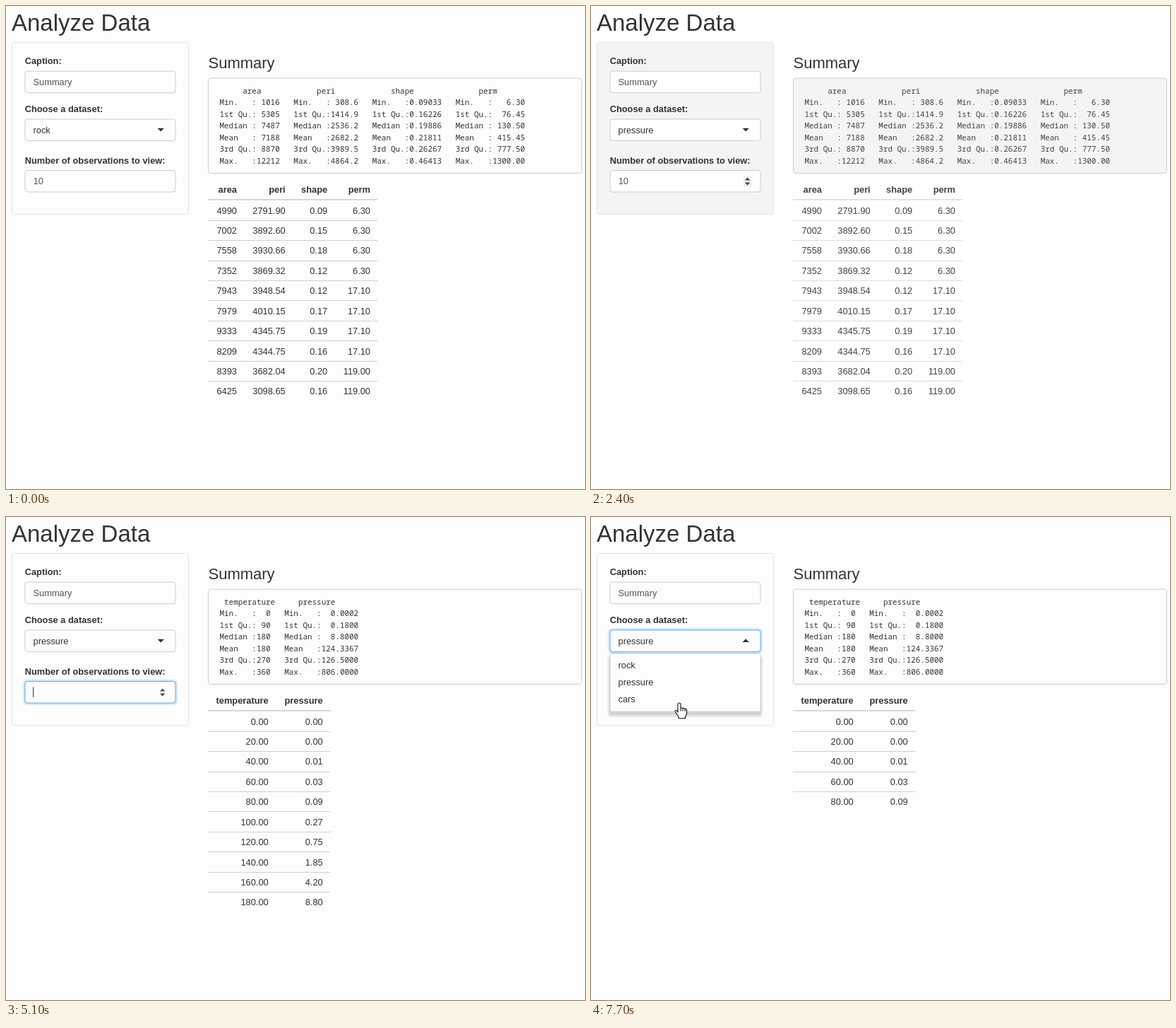
An HTML page for the animation above (8000 ms loop, 820 by 683 pixels).

```html
<!DOCTYPE html>
<html lang="en">
<head>
<meta charset="utf-8">
<title>Analyze Data</title>
<style>
html, body { margin: 0; width: 100%; height: 100%; overflow: hidden; background: #fdfdfd; }
svg { display: block; width: 820px; height: 683px; }
text { font-family: "Liberation Sans", Arial, sans-serif; font-size: 12.83px; fill: #333; white-space: pre; }
.b { font-weight: 700; }
.in { fill: #555; }
.mono text { font-family: "Noto Sans Mono", monospace; font-size: 10.93px; }
.r text { text-anchor: end; }
</style>
</head>
<body>
<svg id="stage" viewBox="0 0 820 683" xmlns="http://www.w3.org/2000/svg"></svg>
<script>
const LOOP = 8000;
const stage = document.getElementById('stage');

const rect = (x, y, w, h, attrs) => `<rect x="${x}" y="${y}" width="${w}" height="${h}" ${attrs}/>`;
const text = (x, y, s, attrs = '') => `<text x="${x}" y="${y}" ${attrs}>${s}</text>`;
const path = (d, attrs = 'fill="#333"') => `<path d="${d}" ${attrs}/>`;

const stats = ['Min.   :', '1st Qu.:', 'Median :', 'Mean   :', '3rd Qu.:', 'Max.   :'];

const rock = {
  head: '     area            peri            shape              perm',
  width: 240,
  sums: [
    [5, '1016 5305 7487 7188 8870 12212'],
    [6, '308.6 1414.9 2536.2 2682.2 3989.5 4864.2'],
    [7, '0.09033 0.16226 0.19886 0.21811 0.26267 0.46413'],
    [7, '6.30 76.45 130.50 415.45 777.50 1300.00']
  ],
  cols: [
    [327, 'area', '4990 7002 7558 7352 7943 7979 9333 8209 8393 6425'],
    [395.7, 'peri', '2791.90 3892.60 3930.66 3869.32 3948.54 4010.15 4345.75 4344.75 3682.04 3098.65'],
    [455.2, 'shape', '0.09 0.15 0.18 0.12 0.12 0.17 0.19 0.16 0.20 0.16'],
    [516, 'perm', '6.30 6.30 6.30 6.30 17.10 17.10 17.10 17.10 119.00 119.00']
  ]
};

const pressure = {
  head: ' temperature     pressure',
  width: 173.5,
  sums: [
    [3, '0 90 180 180 270 360'],
    [8, '0.0002 0.1800 8.8000 124.3367 126.5000 806.0000']
  ],
  cols: [
    [371.7, 'temperature', Array.from({ length: 10 }, (_, i) => (i * 20).toFixed(2)).join(' ')],
    [448.7, 'pressure', '0.00 0.00 0.01 0.03 0.09 0.27 0.75 1.85 4.20 8.80']
  ]
};

// Pointer: start time, kind, hotspot
const moves = [
  [0, ''],
  [400, 'arrow', 30, 0], [500, 'arrow', 66, 72], [600, 'arrow', 112, 140], [700, 'arrow', 150, 196],
  [800, 'hand', 172, 182], [1200, ''],
  [1600, 'hand', 170, 198], [1700, 'hand', 167, 212], [1800, 'hand', 163, 224], [1900, 'hand', 160, 232],
  [2100, ''],
  [6700, 'arrow', 93, 222], [6800, 'hand', 95, 189.5], [6900, 'hand', 96, 185], [7000, 'hand', 97, 182],
  [7200, ''],
  [7500, 'hand', 104, 206], [7600, 'hand', 116, 240], [7700, 'hand', 125, 263]
];

// Number field: start time, value, caret x (0 = hidden)
const typing = [
  [0, '10', 0], [4200, '10', 53.5], [4700, '10', 0], [5000, '1', 46.2], [5100, '', 38.7],
  [5400, '5', 46.4], [5900, '5', 0], [6400, '5', 46.4], [6900, '5', 0]
];

const shapes = {
  hand: 'M-2 13V2A2 2 0 0 1 2 2V8C2 6.2 5 6.2 5 8.4C5 6.8 8 6.8 8 9.2C8 7.8 10.6 8 10.6 10.4' +
    'V15.5L8.4 19.5V21.8H-1V19.3L-5.7 12.6C-6.7 10.8-4.6 9.4-3.4 10.9ZM2 8V11.5M5 8.4V11.5M8 9.2V11.8',
  arrow: 'M.5 .5V16.5L4.3 13L6.8 18.8L9.3 17.7L6.8 12H11.7Z'
};

const at = (list, t) => list.filter(k => k[0] <= t).pop();
const within = (t, a, b) => t >= a && t < b;

function caret(x, y) {
  return rect(x - 0.5, y, 1, 14.5, 'fill="#222"');
}

function field(y, focus, fill) {
  const box = attrs => rect(27, y, 213, 30.5, `rx="3.5" ${attrs}`);
  const glow = focus
    ? box('fill="none" stroke="#66afe9" stroke-width="7" opacity=".14"') +
      box('fill="none" stroke="#66afe9" stroke-width="4" opacity=".22"')
    : '';
  return glow + box(`fill="${fill}" stroke="${focus ? '#66afe9' : '#ccc'}"`);
}

function spinner(busy) {
  const fill = `fill="${busy ? '#444' : '#505050'}"`;
  return (busy ? rect(216, 240, 12, 15.5, 'fill="#efefef"') : '') +
    path('M217.8 246.4L221.6 242.4L225.4 246.4Z', fill) +
    path('M217.8 249.4L221.6 253.4L225.4 249.4Z', fill);
}

function menu() {
  return rect(23.5, 196, 219.5, 87, 'rx="5" fill="#e6e6e6"') +
    rect(26, 198, 215, 82, 'rx="4" fill="#d2d2d2"') +
    rect(27, 192.5, 213, 82.5, 'rx="2" fill="#fdfdfd" stroke="#d0d0d0" stroke-width=".9"') +
    ['rock', 'pressure', 'cars'].map((s, i) => text(38.5, 214.4 + i * 24, s)).join('');
}

function summary(data) {
  const cols = data.sums.map(([w, s]) => s.split(' ').map(v => v.padStart(w)));
  const lines = stats.map((name, i) => cols.map(c => name + c[i]).join('   '));
  return '<g class="mono">' +
    [data.head, ...lines].map((s, i) => text(302.5, 123.9 + i * 16.5, s)).join('') + '</g>';
}

function table(data, rows, line) {
  const cells = data.cols.map(([x, name, s]) =>
    text(x, 264, name, 'class="b"') +
    s.split(' ').slice(0, rows).map((v, i) => text(x, 293.5 + i * 28.44, v)).join(''));
  let rules = rect(286, 273, data.width, 1.6, `fill="${line}"`);
  for (let i = 1; i < rows; i++) {
    rules += rect(286, Math.round(274.2 + i * 28.44), data.width, 1, `fill="${line}"`);
  }
  return rules + '<g class="r">' + cells.join('') + '</g>';
}

function draw(t) {
  const busy = within(t, 2400, 2500) || within(t, 5800, 5900);
  const open = within(t, 1200, 2100) || t >= 7200;
  const data = t < 2500 ? rock : pressure;
  const choice = t < 2100 ? 'rock' : 'pressure';
  const rows = t < 5900 ? 10 : 5;
  const page = busy ? '#fff' : '#fdfdfd';
  const panel = busy ? '#f4f4f4' : '#fdfdfd';
  const [, value, caretX] = at(typing, t);
  const [, kind, px, py] = at(moves, t);

  let out = rect(0, 0, 820, 683, `fill="${page}"`) +
    text(8, 35, 'Analyze Data', 'style="font-size:33px"') +
    rect(8.5, 51.5, 250, 243.3, `rx="3.5" fill="${panel}" stroke="#e3e3e3"`) +
    text(26.7, 82.3, 'Caption:', 'class="b"') +
    field(92.2, false, page) +
    text(38.5, 112, 'Summary', 'class="in"') +
    text(26.7, 150.3, 'Choose a dataset:', 'class="b"') +
    text(26.7, 222.6, 'Number of observations to view:', 'class="b"') +
    field(232.5, within(t, 4300, 7200), page) +
    text(38.7, 252, value, 'class="in"');
  if (t >= 2100) out += spinner(busy);
  if (caretX) out += caret(caretX, 240.3);

  if (open) out += menu();
  out += field(160, open, page) + text(38.5, 179.5, choice) +
    path(open ? 'M214.5 177L219.2 172.3L223.9 177Z' : 'M214.5 172.7L219.2 177.4L223.9 172.7Z');
  if (within(t, 1200, 1700)) out += caret(63.5, 168);
  if (within(t, 7200, 7700)) out += caret(89, 168);

  out += text(286.5, 88, 'Summary', 'style="font-size:22px"') +
    rect(286.5, 102, 528.8, 134.5, `rx="3.5" fill="${panel}" stroke="#ccc"`) +
    `<g opacity="${busy ? 0.92 : 1}">` + summary(data) +
    table(data, rows, busy ? '#dadada' : '#d0d0d0') + '</g>';

  if (kind) {
    out += `<g transform="translate(${px} ${py})">` +
      path(shapes[kind], 'fill="#fff" stroke="#111" stroke-width="1.1" stroke-linejoin="round"') + '</g>';
  }
  return out;
}

let last = '';
function tick() {
  const now = draw(performance.now() % LOOP);
  if (now !== last) stage.innerHTML = last = now;
  requestAnimationFrame(tick);
}
tick();
</script>
</body>
</html>
```
